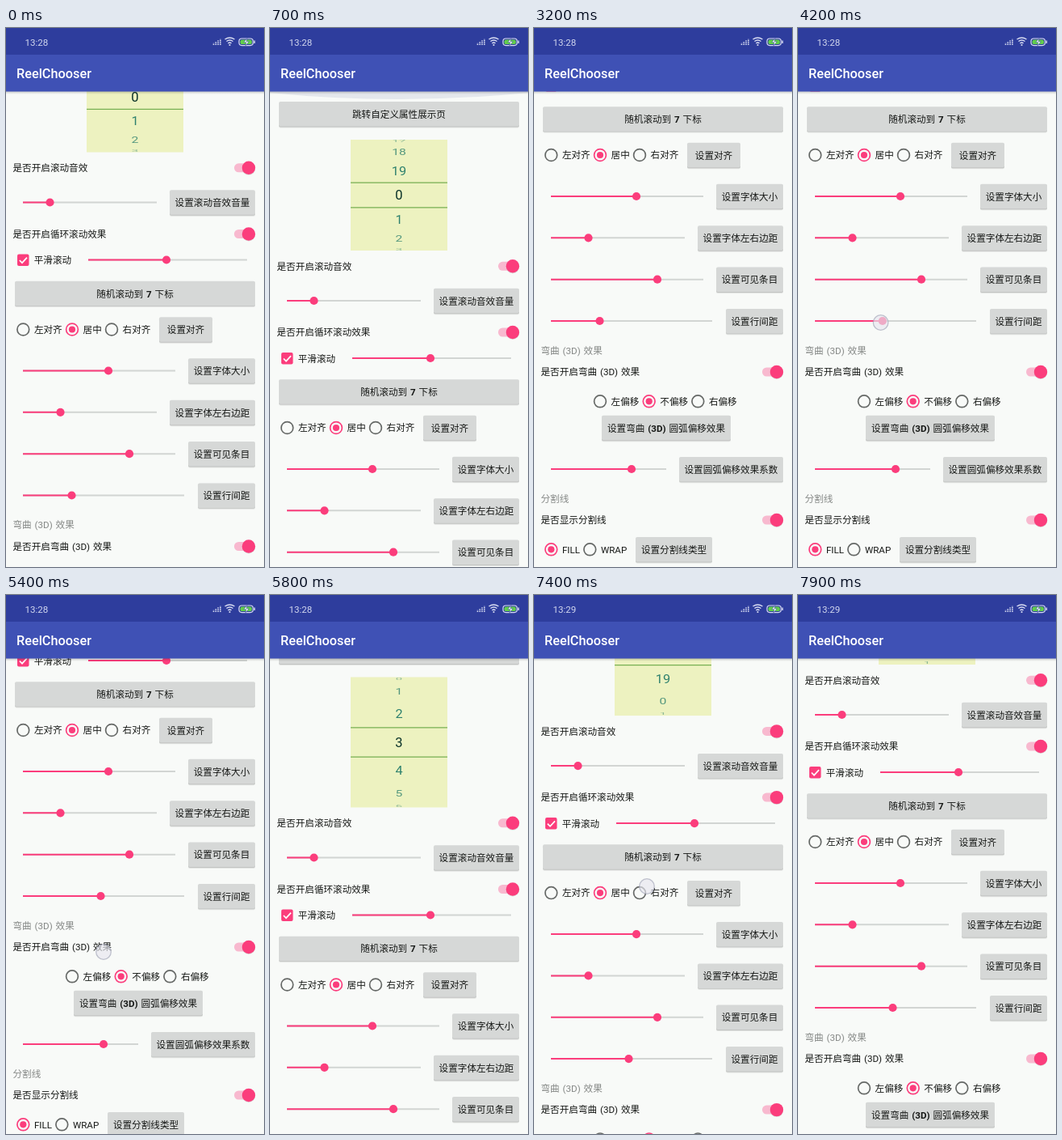
Recreate the animation shown at these times as an HTML page. Size 320 by 666 pixels, loop 8 s.

```html
<!DOCTYPE html>
<html lang="zh">
<head>
<meta charset="utf-8">
<style>
  html, body { margin: 0; width: 100%; height: 100%; overflow: hidden; background: #f8faf8; }
  svg { display: block; width: 100%; height: 100%; }
  text { font: 11.6px Roboto, "Noto Sans CJK SC", "Noto Sans CJK", sans-serif; fill: #161816; white-space: pre; word-spacing: 1px; }
  .mid { text-anchor: middle; }
  .latin { font-weight: 600; }
  .section { fill: #858886; }
  .digit { font-size: 16.5px; text-anchor: middle; }
  .clock { font-size: 11.6px; fill: #d3d8ef; }
  .title { font-size: 16.3px; font-weight: 500; fill: #fff; }
</style>
</head>
<body>
<svg id="stage" viewBox="0 0 320 666">
  <defs>
    <clipPath id="box"><rect id="boxRect" x="100" y="138" width="120"/></clipPath>
    <clipPath id="band"><rect id="bandRect" x="100" width="120"/></clipPath>
    <linearGradient id="shade" x2="0" y2="1">
      <stop stop-color="#000" stop-opacity=".2"/>
      <stop offset="1" stop-color="#000" stop-opacity="0"/>
    </linearGradient>
  </defs>
  <rect width="320" height="666" fill="#f8faf8"/>
  <g id="page">
    <g id="top"></g>
    <rect id="wheel" x="100" y="138" width="120" fill="#edf2c0"/>
    <g id="soft" clip-path="url(#box)"></g>
    <g clip-path="url(#band)">
      <rect id="bandFill" x="100" width="120" fill="#edf2c0"/>
      <g id="strong"></g>
    </g>
    <path id="lines" stroke="#78b053" stroke-width="1.3"/>
    <g id="rest"></g>
  </g>
  <path id="glow" d="M0 78H320V80Q160 96 0 80Z" fill="#8d93b5"/>
  <rect y="78" width="320" height="4" fill="url(#shade)"/>
  <rect width="320" height="33" fill="#2e3d9d"/>
  <rect y="33" width="320" height="45.500" fill="#3f51b5"/>
  <text id="clock" class="clock" x="23.500" y="22"></text>
  <text class="title" x="13" y="62">ReelChooser</text>
  <g id="status" fill="none" stroke="#d8dcf2"></g>
  <circle id="touch" r="9.300" fill="#e6e7ee" fill-opacity=".65" stroke="#9a9cb0" stroke-opacity=".6" stroke-width="1.300"/>
</svg>
<script>
const $ = id => document.getElementById(id);
const PINK = '#fb3d7c';

function add(parent, tag, attrs, text) {
  const el = document.createElementNS('http://www.w3.org/2000/svg', tag);
  for (const k in attrs) el.setAttribute(k, attrs[k]);
  if (text) el.textContent = text;
  parent.append(el);
  return el;
}
const set = (el, attrs) => { for (const k in attrs) el.setAttribute(k, attrs[k]); };

const label = (x, y, text, cls = '') => add($('rest'), 'text', { x, y: y + 4.3, class: cls }, text);

function button(y, x1, x2, text, parent = $('rest')) {
  const box = { x: x1, width: x2 - x1, height: 30.5, rx: 2 };
  add(parent, 'rect', { ...box, y: y - 13.6, fill: '#000', opacity: .09 });
  add(parent, 'rect', { ...box, y: y - 14.6, fill: '#000', opacity: .14 });
  add(parent, 'rect', { ...box, y: y - 15.5, fill: '#d6d8d7' });
  const t = add(parent, 'text', { x: (x1 + x2) / 2, y: y + 4.3, class: 'mid' });
  for (const part of text.split(/([(\w)]+)/)) {
    add(t, 'tspan', { class: /\w/.test(part) ? 'latin' : '' }, part);
  }
}

function toggle(y, text) {
  label(8.5, y, text);
  add($('rest'), 'rect', { x: 283, y: y - 5.5, width: 25, height: 11, rx: 5.5, fill: '#f8b9cf' });
  add($('rest'), 'circle', { cx: 301, cy: y + .8, r: 8.2, fill: '#000', opacity: .12 });
  add($('rest'), 'circle', { cx: 301, cy: y, r: 8.2, fill: PINK });
}

function slider(y, x1, x2, value) {
  const line = { x1, y1: y, y2: y, 'stroke-width': 2 };
  add($('rest'), 'line', { ...line, x2, stroke: '#d2d5d3' });
  const fill = add($('rest'), 'line', { ...line, stroke: PINK });
  const thumb = add($('rest'), 'circle', { cy: y, r: 5.1, fill: PINK });
  const move = v => { set(fill, { x2: v }); set(thumb, { cx: v }); };
  move(value);
  return move;
}

function radio(x, y, text, on) {
  const stroke = on ? PINK : '#666967';
  add($('rest'), 'circle', { cx: x, cy: y, r: 7.4, fill: 'none', stroke, 'stroke-width': 1.7 });
  if (on) add($('rest'), 'circle', { cx: x, cy: y, r: 4.1, fill: PINK });
  label(x + 13.6, y, text);
}

button(106.5, 11, 309, '跳转自定义属性展示页', $('top'));
toggle(294.3, '是否开启滚动音效');
slider(337, 21, 187, 54.5);
button(337.3, 203, 309, '设置滚动音效音量');
toggle(376, '是否开启循环滚动效果');
add($('rest'), 'rect', { x: 14, y: 401, width: 14.5, height: 14.5, rx: 2, fill: PINK });
add($('rest'), 'path', { d: 'M16.800 408.500l3.200 3.200 6-6.500', fill: 'none', stroke: '#fff', 'stroke-width': 1.7 });
label(34.7, 408.3, '平滑滚动');
slider(408, 102, 299, 199);
button(449.7, 11, 309, '随机滚动到 7 下标');
radio(21.3, 494, '左对齐');
radio(82, 494, '居中', true);
radio(131, 494, '右对齐');
button(494.3, 190, 256, '设置对齐');
slider(545, 21, 210, 127);
button(545.3, 226, 309, '设置字体大小');
slider(596.3, 21, 187, 67.5);
button(596.8, 203, 309, '设置字体左右边距');
slider(647.7, 21, 210, 153);
button(648, 226, 309, '设置可见条目');
const moveSpacing = slider(699, 21, 221, 81.5);
button(699.4, 238, 309, '设置行间距');
label(8.5, 735.5, '弯曲 (3D) 效果', 'section');
toggle(762, '是否开启弯曲 (3D) 效果');
radio(82, 798.3, '左偏移');
radio(142.7, 798.3, '不偏移', true);
radio(203.3, 798.3, '右偏移');
button(831.3, 84, 244, '设置弯曲 (3D) 圆弧偏移效果');
slider(882, 21, 164, 121);
button(882.4, 180, 309, '设置圆弧偏移效果系数');
label(8.5, 918.2, '分割线', 'section');
toggle(945, '是否显示分割线');
radio(21.3, 981.3, 'FILL', true);
radio(69.3, 981.3, 'WRAP');
button(981.5, 126, 221, '设置分割线类型');

// Status icons: signal, wifi, battery
for (let i = 0; i < 4; i++) {
  add($('status'), 'path', { d: `M${257.5 + i * 2.8} 21v${-2.5 - i * 1.6}`, 'stroke-width': 1.6, 'stroke-dasharray': '1.5 .7' });
}
for (const r of [2.5, 5, 7.5]) {
  const w = r * .8;
  add($('status'), 'path', { d: `M${277.5 - w} ${21.5 - r}Q277.500 ${20.8 - r * 1.45} ${277.5 + w} ${21.5 - r}`, 'stroke-width': 1.5 });
}
add($('status'), 'circle', { cx: 277.5, cy: 21, r: 1.1, fill: '#d8dcf2', stroke: 'none' });
add($('status'), 'rect', { x: 289, y: 13, width: 17.5, height: 8.6, rx: 3.5, 'stroke-width': 1.2 });
add($('status'), 'rect', { x: 290.5, y: 14.5, width: 14.5, height: 5.6, rx: 2.2, fill: '#62cf4b', stroke: 'none' });
add($('status'), 'path', { d: 'M308.300 15.500v3.500', 'stroke-width': 1.4 });
add($('status'), 'path', { d: 'M299 12.500l-4 5.300h3l-1 4.500 4.200-5.600h-3z', fill: '#fff', stroke: '#2e3d9d', 'stroke-width': .5 });

const SLOTS = 9, ITEMS = 20;
const digits = [['soft', '#1f7867'], ['strong', '#0b3329']].map(([id, fill]) =>
  Array.from({ length: SLOTS }, () => add($(id), 'text', { class: 'digit', style: `fill:${fill}` })));

const linear = u => u;
const easeOut = u => 1 - (1 - u) ** 3;
const inOut = u => u * u * (3 - 2 * u);

// Each step: start, end, from, to, easing
function track(steps, t) {
  let value = steps[0][2];
  for (const [start, end, from, to, ease = linear] of steps) {
    if (t < start) break;
    value = from + (to - from) * ease(Math.min(1, (t - start) / (end - start)));
  }
  return value;
}

const SCROLL = [
  [200, 600, 121.5, 0, inOut],
  [2700, 3200, 0, 337, easeOut],
  [4800, 5100, 337, 351, easeOut],
  [5400, 5900, 351, 0, inOut],
  [7200, 7800, 0, 213, easeOut],
];
const SPIN = [
  [1100, 2200, 0, 1.67],
  [2200, 2600, 1.67, 3, easeOut],
  [6300, 6500, 3, 2.89],
  [6500, 7000, 2.89, -2, easeOut],
];
const SPACING = [[3900, 4400, 81.5, 117.5, inOut]];
const GLOW = [[500, 600, 0, .25], [600, 1000, .25, 0], [5800, 5900, 0, .25], [5900, 6200, .25, 0]];
// Each touch: start, end, x1, y1, x2, y2
const TOUCHES = [
  [250, 500, 150, 380, 150, 500],
  [1100, 2200, 193, 245, 193, 195],
  [2200, 2400, 193, 195, 193, 165],
  [2700, 2900, 140, 560, 140, 330],
  [3900, 4400, 81, 364, 117, 364],
  [4600, 4700, 274, 364, 274, 364],
  [5400, 5700, 121, 441, 121, 610],
  [6300, 6500, 211, 140, 211, 144],
  [6500, 6900, 211, 144, 211, 320],
  [7200, 7400, 140, 500, 140, 360],
];

function drawWheel(pos, grow) {
  const height = 137 + grow, radius = height / 2, mid = 138 + radius;
  const step = Math.PI / 7, row = radius * step;
  for (const id of ['wheel', 'boxRect']) set($(id), { height });
  for (const id of ['bandRect', 'bandFill']) set($(id), { y: mid - row / 2, height: row });
  set($('lines'), { d: `M100 ${mid - row / 2}h120M100 ${mid + row / 2}h120` });
  const first = Math.round(pos) - 4;
  for (const layer of digits) layer.forEach((el, i) => {
    const angle = (first + i - pos) * step, c = Math.cos(angle);
    el.textContent = ((first + i) % ITEMS + ITEMS) % ITEMS;
    set(el, {
      visibility: Math.abs(angle) < Math.PI / 2 ? 'visible' : 'hidden',
      opacity: .3 + .7 * Math.max(0, c),
      y: 5.9,
      transform: `translate(160 ${mid + radius * Math.sin(angle)}) scale(${.88 + .12 * c} ${c})`,
    });
  });
}

function draw(t) {
  const grow = t >= 4800 ? 24 : 0;
  set($('page'), { transform: `translate(0 ${-track(SCROLL, t)})` });
  set($('rest'), { transform: `translate(0 ${grow})` });
  drawWheel(track(SPIN, t), grow);
  moveSpacing(track(SPACING, t));
  set($('glow'), { opacity: track(GLOW, t) });
  $('clock').textContent = t < 6300 ? '13:28' : '13:29';
  const touch = TOUCHES.findLast(([start, end]) => t >= start && t <= end);
  set($('touch'), { visibility: touch ? 'visible' : 'hidden' });
  if (touch) {
    const [start, end, x1, y1, x2, y2] = touch;
    set($('touch'), { cx: track([[start, end, x1, x2]], t), cy: track([[start, end, y1, y2]], t) });
  }
}

const LOOP = 8000, TICK = 100;
const origin = performance.now();
function frame() {
  const t = (performance.now() - origin) % LOOP;
  draw(Math.floor(t / TICK) * TICK);
  requestAnimationFrame(frame);
}
frame();
</script>
</body>
</html>
```
